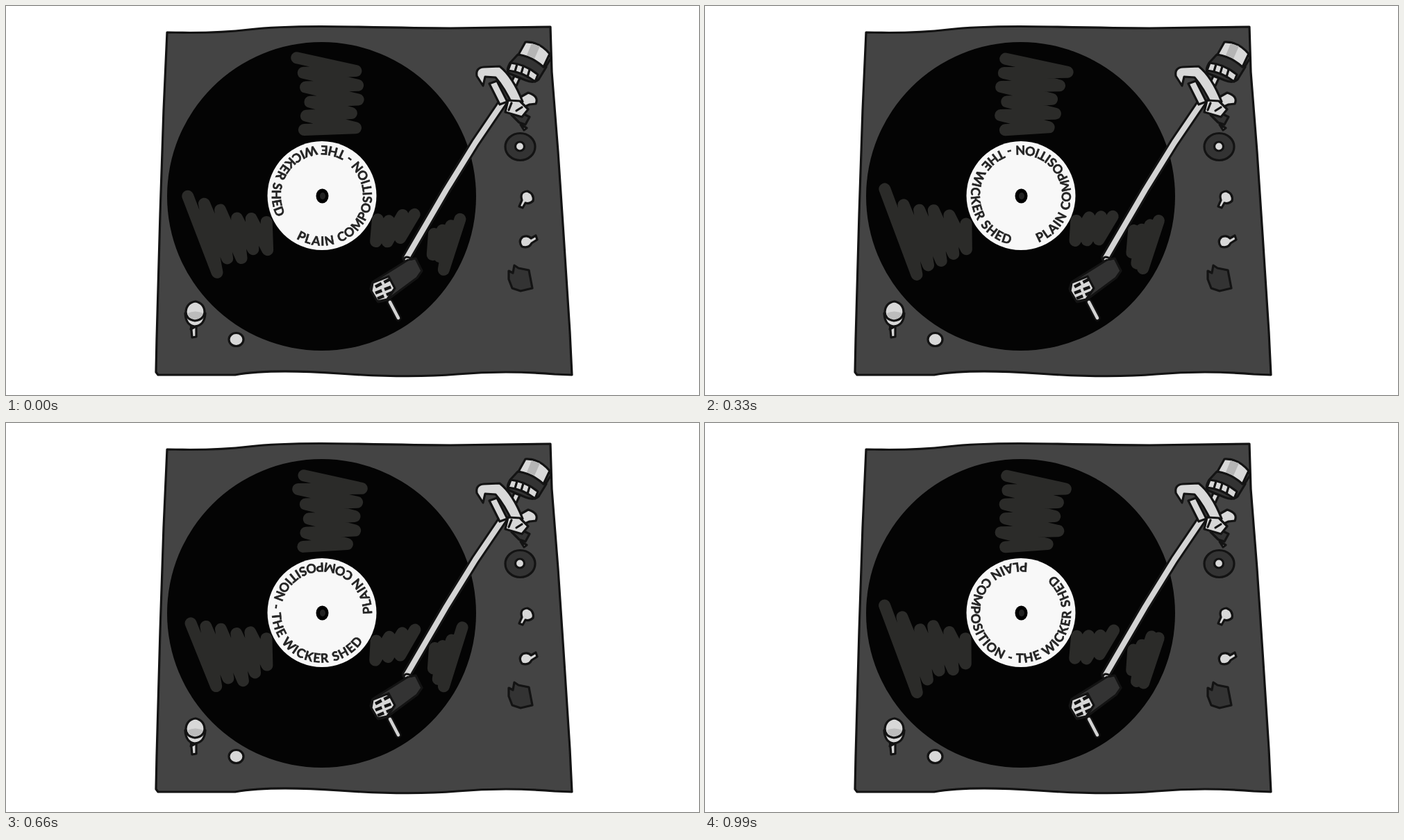
An HTML page for the animation above (1100 ms loop, 998 by 561 pixels).

```html
<!DOCTYPE html>
<html lang="en">
<head>
<meta charset="utf-8">
<title>Turntable</title>
<style>
  html, body { margin: 0; width: 100%; height: 100%; overflow: hidden; background: #fff; }
  svg { display: block; width: 100%; height: 100%; }
  text { font: 700 18px Lato, "Open Sans", sans-serif; letter-spacing: 1.4px; fill: #242424; stroke: #242424; stroke-width: .6; }
  .ink { stroke: #131313; stroke-width: 3.2; stroke-linejoin: round; stroke-linecap: round; }
  .line { fill: none; stroke-linecap: round; stroke-linejoin: round; }
  .dark { fill: #333; }
  .light { fill: #d8d8d8; }
  .outer { stroke: #131313; stroke-width: 14; }
  .core { stroke: #d4d4d4; stroke-width: 8; }
  .slots { fill: none; stroke: #131313; stroke-width: 4.5; stroke-dasharray: 10 4; }
  #shine { stroke: #2b2b29; stroke-width: 17; }
</style>
</head>
<body>
<svg viewBox="0 0 998 561">
  <path class="ink" fill="#444" d="M232,38 Q300,40 350,34 T500,30 T640,32 L784,30 786,95 795,210 803,330
    812,470 815,532 790,531 Q720,525 650,531 T480,530 T330,532 L219,532 216,528 217,480 222,300 227,150Z"/>
  <circle cx="454.5" cy="274.5" r="222.5" fill="#040404"/>
  <g id="shine" class="line"></g>

  <circle cx="455" cy="273.5" r="78.5" fill="#f8f8f8"/>
  <path id="ring" fill="none" d="M455,345.5 a72,72 0 0 0 0,-144 a72,72 0 0 0 0,144"/>
  <g id="label"><text><textPath href="#ring">PLAIN COMPOSITION - THE WICKER SHED</textPath></text></g>
  <ellipse cx="455.5" cy="274" rx="9" ry="10.5"/>
  <ellipse cx="456" cy="274" rx="4" ry="5" fill="#222"/>

  <!-- counterweight -->
  <g class="ink">
    <path class="dark" d="M737,70 Q757,72 778,88 L767,106 Q760,112 748,107 L724,97 Q720,92 726,82Z"/>
    <path class="light" d="M748,52 Q768,51 783,69 L774,88 Q758,73 738,70Z"/>
    <path class="light" d="M727,82 Q748,84 766,99 L762,109 Q744,95 723,93Z"/>
    <path class="line" d="M736,84 l-3,10 M745,87 l-3,10 M754,92 l-3,10 M783,69 l2,6 -8,13"/>
  </g>
  <path fill="#b5b5b5" d="M757,54 L769,58 761,76 750,71Z"/>

  <!-- tonearm -->
  <g class="line">
    <path class="outer" d="M716,138 L676,197 634,265 577,363"/>
    <path class="core" d="M716,138 L676,197 634,265 577,363"/>
  </g>

  <!-- pivot -->
  <g class="ink">
    <path class="dark" d="M728,157 L738,152 754,160 748,171 739,168Z"/>
    <path class="light" d="M741,171 L750,176 746,179Z"/>
    <path class="light" d="M732,101 l8,3 -5,11 -8,-3Z"/>
    <path class="light" d="M738,133 L752,125 Q768,130 763,141 L754,142 743,147Z"/>
    <path class="light" d="M696,112 L707,108 722,138 711,142Z"/>
    <path class="light" d="M678,101 Q676,89 688,88 L711,87 Q730,102 744,138 L730,144 Q718,118 705,103 L690,102 687,115Z"/>
    <path class="light" d="M723,136 L740,137 752,149 743,160 719,153Z"/>
    <path class="line" d="M728,140 L724,150 M735,151 l8,-5"/>
  </g>

  <!-- head -->
  <g class="line">
    <path class="outer" stroke-width="10" style="stroke-width:9" d="M553,427 L565,450"/>
    <path class="core" style="stroke-width:4.5" d="M553,427 L565,450"/>
  </g>
  <g class="ink">
    <path class="dark" d="M528,398 L579,366 590,364 599,382 592,392 549,424 536,427 525,408Z"/>
    <path class="light" d="M528,399 L551,390 560,407 549,423 535,426 526,411Z"/>
    <path class="light" d="M573,365 Q576,359 584,365"/>
  </g>
  <path class="slots" d="M532,405 l21,-11 M532,414 l23,-9 M535,422 l21,-9"/>

  <!-- controls -->
  <g class="ink">
    <ellipse class="dark" cx="740.5" cy="203" rx="21.5" ry="19.5"/>
    <circle class="light" cx="740" cy="202.5" r="6.5"/>
    <path class="light" d="M739,289 L743,280 Q739,268 751,267 Q761,271 759,281 Q754,286 748,284 L744,291Z"/>
    <path class="light" d="M756,335 L763,331 765,337 757,342 Q753,350 743,347 Q737,339 744,333 Q752,330 756,335Z"/>
    <path class="dark" d="M724,382 L730,385 732,374 738,378 753,381 758,407 741,411 729,407 724,394Z"/>
    <path class="light" d="M266,457 L274,457 274,477 268,478Z"/>
    <path class="light" d="M258,443 Q259,461 272,462 Q286,461 287,443Z"/>
    <path class="light" d="M259,441 Q260,428 273,426 Q286,429 286,442 Q284,453 272,454 Q259,452 259,441Z"/>
    <path class="line" d="M266,466 l8,-4"/>
    <ellipse class="light" cx="331.5" cy="481" rx="10.5" ry="9.5"/>
  </g>
  <path fill="#bcbcbc" d="M262,443 Q272,438 284,443 Q282,451 272,452 Q262,450 262,443Z"/>
</svg>
<script>
const STEP = 110, STEPS = 10;

// Each scribble zigzags along a spine; reach is the stroke's half length at either end.
const scribbles = [
  { from: [472, 80], to: [464, 182], dir: [1, .1], reach: [50, 34], turns: 10 },
  { from: [278, 330], to: [380, 328], dir: [.29, 1], reach: [62, 17], turns: 10 },
  { from: [529, 326], to: [582, 318], dir: [-.35, 1], reach: [17, 20], turns: 6 },
  { from: [614, 338], to: [645, 343], dir: [-.25, 1], reach: [14, 47], turns: 6 }
];
const shine = document.getElementById("shine");
const label = document.getElementById("label");
for (const s of scribbles) {
  s.line = document.createElementNS("http://www.w3.org/2000/svg", "polyline");
  shine.append(s.line);
}

const mix = (a, b, k) => a + (b - a) * k;
const rand = n => {
  const v = Math.sin(n * 12.9898) * 43758.5453;
  return v - Math.floor(v);
};

function zigzag({ from, to, dir, reach, turns }, seed) {
  return Array.from({ length: turns + 1 }, (_, n) => {
    const k = n / turns;
    const size = mix(...reach, k) * mix(.65, 1.1, rand(seed + n));
    const offset = n % 2 ? size : -size;
    return [0, 1].map(a => mix(from[a], to[a], k) + offset * dir[a]);
  }).join(" ");
}

function draw() {
  const step = Math.floor(performance.now() / STEP) % STEPS;
  scribbles.forEach((s, i) => s.line.setAttribute("points", zigzag(s, 1 + step * 100 + i * 20)));
  const angle = -31 + 14.5 * step + .9 * step * step;
  label.setAttribute("transform", `rotate(${-angle} 455 273.5)`);
  requestAnimationFrame(draw);
}
draw();
</script>
</body>
</html>
```
